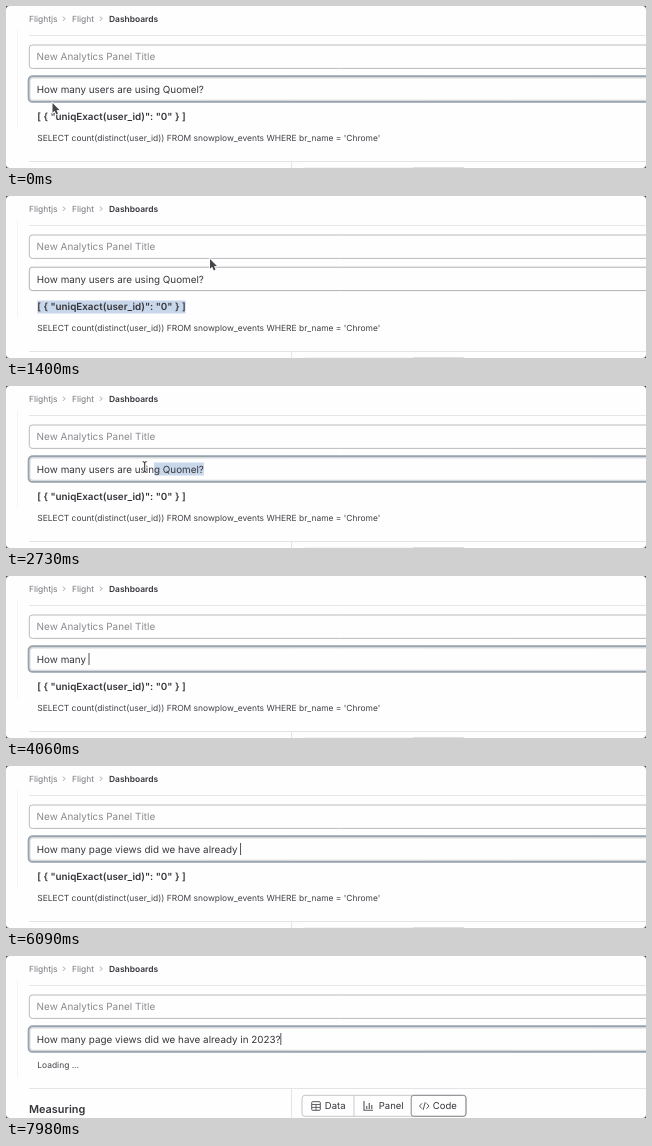
An HTML page with a canvas for the animation above (8 s loop, 640 px wide and 162 px high).

```html
<!DOCTYPE html>
<html lang="en">
<head>
<meta charset="utf-8">
<title>Analytics panel</title>
<style>
html, body { margin: 0; width: 100%; height: 100%; overflow: hidden; background: #fff; }
canvas { display: block; width: 640px; height: 162px; }
</style>
</head>
<body>
<canvas id="stage" width="640" height="162"></canvas>
<script>
const ctx = document.getElementById('stage').getContext('2d');
const LOOP = 8000, FRAME = 70, KEY_MS = 58;
const PRESS = 600, CLICK = 1820, DRAG = 2310, DELETE = 3570, SUBMIT = 7560;
const LEFT = 30.8, RESULT_LEFT = 31.3;
const INK = '#36353b', GREY = '#77767c', ICON = '#55545a', SELECTED = '#c9d7ea';

const JSON_TEXT = '[ { "uniqExact(user_id)": "0" } ]';
const SQL = "SELECT count(distinct(user_id)) FROM snowplow_events WHERE br_name = 'Chrome'";
const FIRST = 'How many users are using Quomel?';
const KEPT = 'How many ';

const font = (size, weight = 400) => `${weight} ${size}px Inter, "Noto Sans", sans-serif`;
const BODY = font(9.85), BOLD = font(9.85, 600), SMALL = font(8.45);

// Each phrase is typed at a steady pace after a pause.
const phrases = [
  [4130, 'page '], [4420, 'views '], [4900, 'did we '], [5390, 'have already '],
  [6650, 'in '], [6860, '2023'], [7350, '?']
];

const stops = [
  { t: 0, x: 46.5, y: 97 }, { t: 420, x: 30, y: 110 }, { t: PRESS, x: 30, y: 110 },
  { t: 1100, x: 186, y: 110 }, { t: 1400, x: 204, y: 63 }, { t: CLICK, x: 201, y: 83 },
  { t: 2240, x: 199, y: 82 }, { t: 3200, x: 82, y: 80 }
];

const between = (t, from, to) => t >= from && t < to;

function typedAt(t) {
  return phrases.map(([start, words]) =>
    words.slice(0, Math.max(0, Math.floor((t - start) / KEY_MS) + 1))).join('');
}

function pointerAt(t) {
  const i = stops.findIndex(s => s.t > t);
  if (i < 0) return stops[stops.length - 1];
  const a = stops[i - 1], b = stops[i];
  const k = (t - a.t) / (b.t - a.t), e = k * k * (3 - 2 * k);
  return { x: a.x + (b.x - a.x) * e, y: a.y + (b.y - a.y) * e };
}

function text(str, x, y, face, color = INK) {
  ctx.font = face;
  ctx.fillStyle = color;
  ctx.fillText(str, x, y);
}

function widthOf(str, face) {
  ctx.font = face;
  return ctx.measureText(str).width;
}

function rect(x, y, w, h, color) {
  ctx.fillStyle = color;
  ctx.fillRect(x, y, w, h);
}

function box(x, y, w, h, r, color, line = 1) {
  ctx.beginPath();
  ctx.roundRect(x, y, w, h, r);
  ctx.strokeStyle = color;
  ctx.lineWidth = line;
  ctx.stroke();
}

function stroke(color, width, ...points) {
  ctx.beginPath();
  points.forEach(p => ctx.lineTo(...p));
  ctx.strokeStyle = color;
  ctx.lineWidth = width;
  ctx.stroke();
}

function chevron(x, y, dx, dy, color, width) {
  stroke(color, width, [x, y - dy], [x + dx, y], [x, y + dy]);
}

// Right edge of the last whole character before x.
function snap(str, left, x, face) {
  let n = 0;
  while (n < str.length && left + widthOf(str.slice(0, n + 1), face) <= x) n++;
  return left + widthOf(str.slice(0, n), face);
}

function drawHeader() {
  text('Flightjs', 23, 15.5, SMALL, GREY);
  text('Flight', 66, 15.5, SMALL, GREY);
  text('Dashboards', 103, 15.5, font(8.45, 600));
  for (const x of [57, 94]) chevron(x, 12.7, 2, 2.1, '#98979c', 0.9);
  rect(23, 29, 617, 1, '#e6e6e8');
  rect(11, 24, 1, 98, '#f5f5f6');
  box(23.3, 39, 630, 23.4, 3, '#bab9be');
  text('New Analytics Panel Title', 30.6, 54.2, font(9.92), '#8a898e');
}

function drawQuestion(t, pointer) {
  if (between(t, PRESS, CLICK)) {
    box(23.3, 71.2, 630, 23.4, 3, '#b0afb4');
  } else {
    box(22.6, 70.3, 640, 25.6, 4, '#98a3ae', 1.9);
    box(23.9, 71.9, 640, 22.4, 3, '#c0c4c9', 0.8);
  }

  const value = t < DELETE ? FIRST : KEPT + typedAt(t);
  const end = LEFT + widthOf(value, BODY);
  if (between(t, DRAG, DELETE)) {
    const reach = snap(FIRST, LEFT, Math.min(end, pointer.x + 11), BODY);
    const start = t < 3150 ? reach : LEFT + widthOf(KEPT, BODY);
    rect(start, 76.5, end - start, 13, SELECTED);
  }
  text(value, LEFT, 86.7, BODY);

  const caret = between(t, CLICK, 2100) || (t >= DELETE && !between(t, 6440, 6650));
  if (caret) rect(end - 0.3, 77, 1, 12, '#55545a');
}

function drawResult(t, pointer) {
  if (t >= SUBMIT) {
    text(t < 7910 ? 'Loading ..' : 'Loading ...', RESULT_LEFT, 111.7, SMALL, '#45444a');
    return;
  }
  if (between(t, PRESS, CLICK)) {
    const reach = t < 1100 ? pointer.x : Infinity;
    const edge = snap(JSON_TEXT, RESULT_LEFT, reach, BOLD);
    rect(RESULT_LEFT, 104.5, edge - RESULT_LEFT, 13, SELECTED);
  }
  text(JSON_TEXT, RESULT_LEFT, 114.2, BOLD);
  text(SQL, RESULT_LEFT, 135, SMALL, '#403f45');
}

function drawIcons() {
  box(305.7, 145.7, 8.6, 8.6, 1, ICON);
  for (const y of [148.5, 151.4]) stroke(ICON, 0.9, [306, y], [314, y]);
  stroke(ICON, 0.9, [310, 148.5], [310, 154]);

  stroke(ICON, 1.1, [358, 145], [358, 154.3], [367, 154.3]);
  [3, 6, 4].forEach((h, i) => rect(360.2 + i * 2.5, 153 - h, 1.1, h, ICON));

  chevron(416, 150, -2.5, 2.7, ICON, 1);
  chevron(420.5, 150, 2.5, 2.7, ICON, 1);
  stroke(ICON, 1, [419.2, 146.2], [417.2, 153.8]);
}

function drawFooter(t) {
  ctx.save();
  if (t < SUBMIT) ctx.translate(0, 23);
  rect(23, 132, 617, 1, '#e4e4e6');
  rect(285, 132, 1, 40, '#e4e4e6');
  text('Measuring', 23, 157, font(10.9, 600));
  box(296, 139.3, 164, 21, 3, '#c6c6ca');
  rect(347.5, 139.5, 1, 21, '#cacace');
  box(405.2, 139.3, 54.8, 21, 2.5, '#8a898f');
  ['Data', 'Panel', 'Code'].forEach((name, i) =>
    text(name, 318.8 + i * 54, 153.2, font(9.5)));
  drawIcons();
  ctx.restore();
}

function drawPointer({ x, y }) {
  const overText = between(y, 72, 95) || between(y, 104, 117);
  ctx.save();
  ctx.translate(x, y);
  if (overText) {
    for (const [color, width] of [['#fff', 2.4], ['#38383c', 1.1]]) {
      stroke(color, width, [0, -4.5], [0, 4.5]);
      for (const side of [-1, 1]) {
        stroke(color, width, [-2, side * 5.5], [0, side * 4.5], [2, side * 5.5]);
      }
    }
  } else {
    const arrow = new Path2D('M0 0V9.8L2.2 7.8 3.8 11.4 5.5 10.6 4 7.2 7 7Z');
    ctx.strokeStyle = '#fff';
    ctx.lineWidth = 1.4;
    ctx.stroke(arrow);
    ctx.fillStyle = '#46464a';
    ctx.fill(arrow);
  }
  ctx.restore();
}

function drawWindow() {
  rect(0, 0, 640, 162, '#444');
  ctx.beginPath();
  ctx.roundRect(0, 0, 640, 162, 3.5);
  ctx.fillStyle = '#fefefe';
  ctx.fill();
  ctx.clip();
}

function draw(now) {
  const t = Math.floor((now % LOOP) / FRAME) * FRAME;
  const pointer = pointerAt(t);
  ctx.textRendering = 'geometricPrecision';
  ctx.save();
  drawWindow();
  drawHeader();
  drawQuestion(t, pointer);
  drawResult(t, pointer);
  drawFooter(t);
  if (t < DELETE) drawPointer(pointer);
  ctx.restore();
  requestAnimationFrame(draw);
}
requestAnimationFrame(draw);
</script>
</body>
</html>
```
